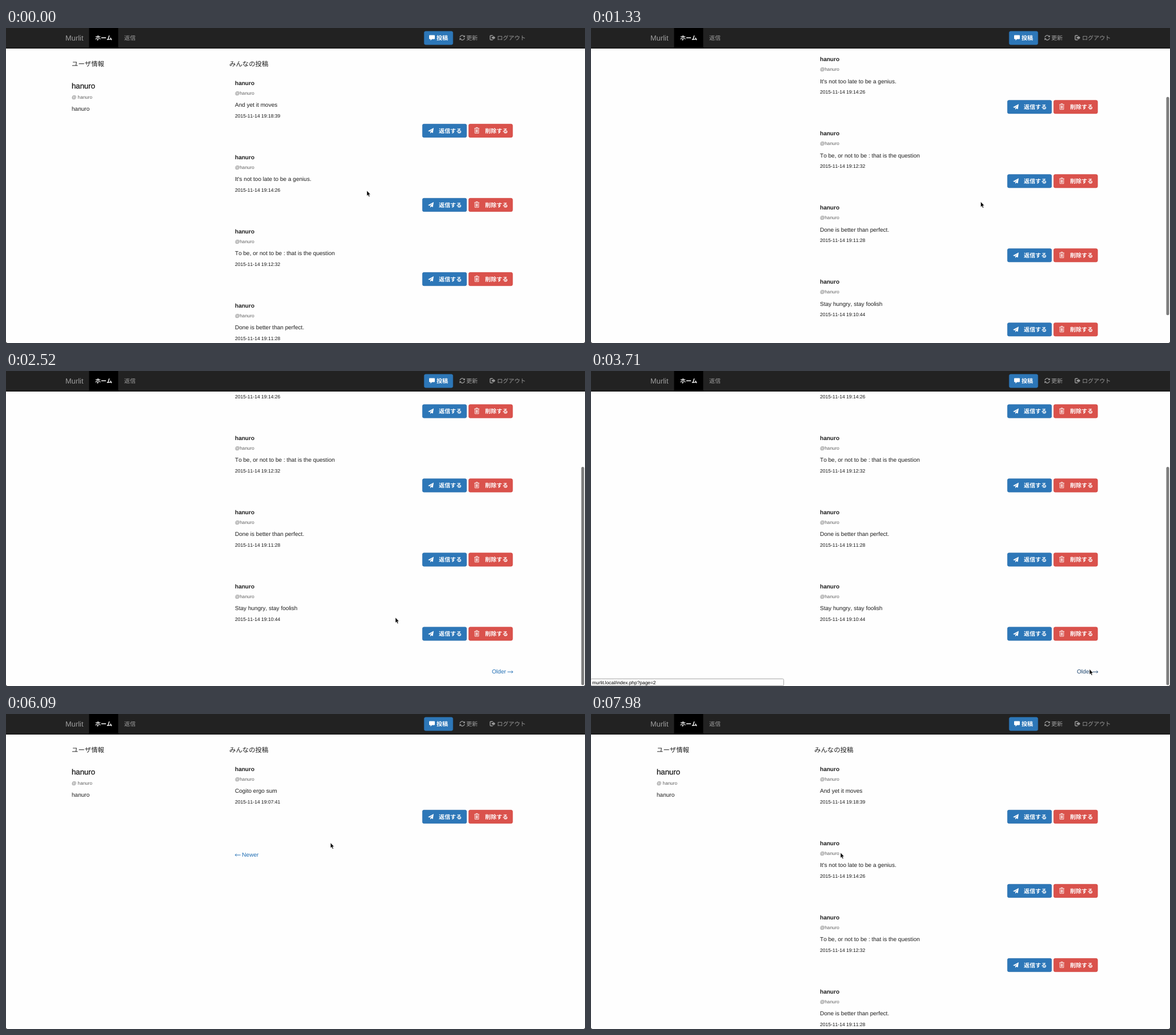
An HTML page that plays this animation: 1014x552 px, repeating every 8 s.

```html
<!DOCTYPE html>
<html lang="ja">
<head>
<meta charset="utf-8">
<title>Timeline</title>
<style>
  html, body { margin: 0; width: 100%; height: 100%; overflow: hidden; background: #fefefe; }
  svg { display: block; }
  text {
    font: 10.06px "Liberation Sans", "Noto Sans CJK JP", "Noto Sans CJK", sans-serif;
    font-kerning: none; fill: #1e1e1e; text-rendering: geometricPrecision; white-space: pre;
  }
  .b { font-weight: bold; }
  .title { font-size: 11.4px; }
  .user { font-size: 13.2px; stroke: #1e1e1e; stroke-width: .3; }
  .small { font-size: 8.2px; fill: #606060; }
  .date { font-size: 8.56px; fill: #141414; }
  .nav { fill: #9d9d9d; }
  .brand { font-size: 12.9px; }
  .white { fill: #fff; }
  .link { color: #1d6cb3; }
  .link.hover { color: #1d456e; }
  .link text { fill: currentColor; }
  .url { font-size: 8.4px; fill: #000; }
  .line { fill: none; stroke: currentColor; }
</style>
</head>
<body>
<svg id="stage" width="1014" height="552" viewBox="0 0 1014 552">
  <defs>
    <path id="comment" fill="currentColor" d="M1 .5H9a1 1 0 0 1 1 1V6.5a1 1 0 0 1-1 1H5L2.5 10V7.5H1a1 1 0 0 1-1-1V1.5a1 1 0 0 1 1-1z"/>
    <path id="plane" fill="currentColor" d="M10 0L8.6 9 5.6 7.8 4 10V7L8.5 2 3 6.6 0 5.5z"/>
    <path id="trash" class="line" d="M0 1.9H9M3 1.9V.4H6V1.9M1.2 2.3V10.4H7.8V2.3M3.2 3.6V9M4.5 3.6V9M5.8 3.6V9" stroke-width=".85"/>
    <g id="refresh">
      <path class="line" stroke-width="1.3" d="M.9 4.5A4 4 0 0 1 8 2.5M9.1 5.5A4 4 0 0 1 2 7.5"/>
      <path fill="currentColor" d="M9.8.5V4H6.3zM.2 9.5V6H3.7z"/>
    </g>
    <g id="logout">
      <path class="line" stroke-width="1.4" d="M5.5 1.2H2Q.9 1.2 .9 2.3V7.7Q.9 8.8 2 8.8H5.5"/>
      <path fill="currentColor" d="M3.6 3.6H6.4V1.5L10 5 6.4 8.5V6.4H3.6z"/>
    </g>
    <path id="right" class="line" d="M0 0H9.3M7-2.2L9.5 0 7 2.2" stroke-width=".9"/>
    <path id="left" class="line" d="M9.5 0H.2M2.500-2.2L0 0 2.500 2.2" stroke-width=".9"/>
  </defs>
  <g id="page1"></g>
  <g id="page2"></g>
  <g id="nav"></g>
  <rect id="thumb" x="1007.5" width="5" rx="2.5" fill="#7d7d7d"/>
  <path d="M0 549V552H3Q0 552 0 549M1014 549V552H1011Q1014 552 1014 549" fill="#111"/>
  <g id="status">
    <rect x="-.5" y="539.5" width="338" height="12" rx="2" fill="#fefefe" stroke="#a9a9a9"/>
    <text id="url" class="url" x="2" y="549"></text>
  </g>
  <path id="cursor" d="M0 0V9.2L2 7.4 3.6 10.8 5.1 10.1 3.6 6.8H6.3z" fill="#000" stroke="#fff" stroke-width=".5"/>
</svg>
<script>
const STEP = 70, LOOP = 8000, VIEW = 552, MAX_SCROLL = 239.5;
const USER = 'hanuro';
const el = id => document.getElementById(id);

const text = (x, y, str, cls = '') => `<text x="${x}" y="${y}" class="${cls}">${str}</text>`;
const icon = (name, x, y, color = 'currentColor') =>
  `<use href="#${name}" x="${x}" y="${y}" color="${color}"/>`;
const button = (x, y, w, h, fill, edge) =>
  `<rect x="${x + .35}" y="${y + .35}" width="${w - .7}" height="${h - .7}" rx="2.6"
    fill="${fill}" stroke="${edge}" stroke-width=".7"/>`;
const blueButton = (x, y, w, h) => button(x, y, w, h, '#2d77b8', '#2a6daa');
const link = (id, content) => `<g id="${id}" class="link">${content}</g>`;

const post = ([body, time], i) => `<g transform="translate(0 ${i * 130})">` +
  text(401, 100.2, USER, 'b') +
  text(401, 117, '@' + USER, 'small') +
  text(401, 138.3, body) +
  text(401, 157.2, '2015-11-14 ' + time, 'date') +
  blueButton(729, 168, 78, 24) + icon('plane', 739, 175, '#fff') +
  text(758, 183.7, '返信する', 'b white') +
  button(810, 168, 77.5, 24, '#da524c', '#d2433d') + icon('trash', 820, 174, '#fff') +
  text(839, 183.7, '削除する', 'b white') + '</g>';

const page = posts =>
  text(115, 67.3, 'ユーザ情報', 'title') +
  text(115, 106, USER, 'user') +
  text(115, 123.5, '@ ' + USER, 'small') +
  text(115, 144.8, USER) +
  text(391, 67.3, 'みんなの投稿', 'title') +
  posts.map(post).join('');

el('page1').innerHTML = page([
  ['And yet it moves', '19:18:39'],
  ["It's not too late to be a genius.", '19:14:26'],
  ['To be, or not to be : that is the question', '19:12:32'],
  ['Done is better than perfect.', '19:11:28'],
  ['Stay hungry, stay foolish', '19:10:44']
]) + link('older', text(851, 769.7, 'Older') + icon('right', 878.3, 766.8));

el('page2').innerHTML = page([['Cogito ergo sum', '19:07:41']]) +
  link('newer', icon('left', 401.2, 247.1) + text(413.3, 250, 'Newer'));

el('nav').innerHTML =
  '<path fill="#222" d="M0-5H1014V36H0z"/><path fill="#080808" d="M0 35H1014V36H0z"/>' +
  '<path fill="#000" d="M145.500-5H196.500V35H145.500z"/>' +
  text(104, 22, 'Murlit', 'nav brand') +
  text(156, 21, 'ホーム', 'b white') +
  text(207, 21, '返信', 'nav') +
  blueButton(732, 5.5, 51, 24) + icon('comment', 741, 12, '#fff') +
  text(754, 21, '投稿', 'b white') +
  icon('refresh', 794, 12, '#9d9d9d') + text(806, 21, '更新', 'nav') +
  icon('logout', 847, 12, '#9d9d9d') + text(860, 21, 'ログアウト', 'nav');

// start, number of steps, end x, end y
const MOVES = [
  [350, 3, 682.5, 304.5],
  [2100, 2, 677, 345], [2240, 2, 681, 409],
  [2520, 4, 685, 501],
  [2870, 5, 922, 538],
  [3360, 4, 873, 522.5],
  [4900, 3, 867.5, 372.5],
  [5250, 3, 689, 288],
  [5670, 3, 598, 221.5],
  [6090, 3, 509, 234],
  [6510, 5, 437, 243]
];
const SCROLL_START = 980;
const SCROLL = [4, 17, 45, 86, 131, 171.7, 206, 229, 239.5, 241.6, 241.3, 240.8, 240.3, MAX_SCROLL];
const STATUS = [[0, 0], [3640, .5], [3710, 1], [4480, .5], [4550, 0],
  [6860, .5], [6930, 1], [7840, .65], [7910, .3], [7980, 0]];

function cursorAt(t) {
  let x = 632, y = 285;
  for (const [start, steps, endX, endY] of MOVES) {
    if (t < start) break;
    const k = Math.min(1, (Math.floor((t - start) / STEP) + 1) / steps);
    x += (endX - x) * k;
    y += (endY - y) * k;
  }
  return [x, y];
}

function scrollAt(t) {
  if (t < SCROLL_START) return 0;
  const i = Math.floor((t - SCROLL_START) / STEP);
  return SCROLL[Math.min(i, SCROLL.length - 1)];
}

const show = (id, on) => el(id).setAttribute('visibility', on ? 'visible' : 'hidden');
const move = (id, x, y) => el(id).setAttribute('transform', `translate(${x} ${y})`);

function draw(t) {
  const second = t >= 4410 && t < 7770;
  const scroll = t < 4410 ? scrollAt(t) : 0;
  const over = Math.max(0, scroll - MAX_SCROLL);
  const top = scroll * VIEW / (VIEW + MAX_SCROLL);

  show('page1', !second);
  show('page2', second);
  move('page1', 0, -scroll);
  move('nav', 0, -over);

  show('thumb', scroll > 0);
  el('thumb').setAttribute('y', top + 1);
  el('thumb').setAttribute('height', Math.min(382.5, VIEW - 1 - top));

  el('older').classList.toggle('hover', t >= 3500 && t < 4410);
  el('newer').classList.toggle('hover', t >= 6720);
  el('status').setAttribute('opacity', STATUS.findLast(([start]) => t >= start)[1]);
  el('url').textContent = `murlit.local/index.php?page=${t < 5000 ? 2 : 1}`;
  move('cursor', ...cursorAt(t));
}

function tick() {
  draw(performance.now() % LOOP);
  requestAnimationFrame(tick);
}
tick();
</script>
</body>
</html>
```
